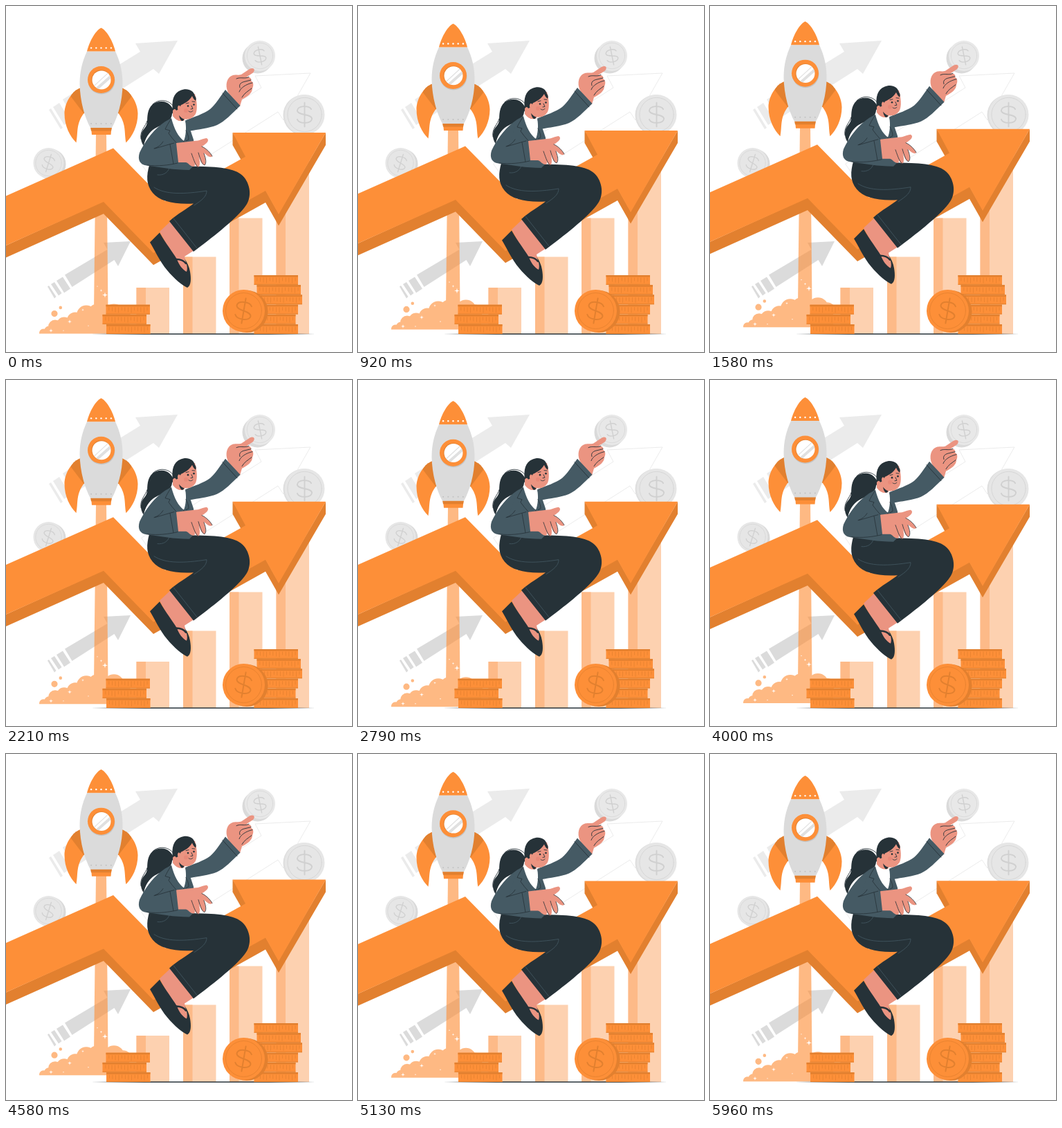
Write an HTML page with a canvas that moves like this. It is 500 by 500 pixels and loops after 6000 ms.

```html
<!DOCTYPE html>
<html lang="en">
<head>
<meta charset="utf-8">
<title>Growth</title>
<style>
html, body { margin: 0; width: 100%; height: 100%; overflow: hidden; background: #fff; }
canvas { display: block; width: 500px; height: 500px; }
</style>
</head>
<body>
<canvas id="stage"></canvas>
<script>
const canvas = document.getElementById('stage');
const ctx = canvas.getContext('2d');
const ratio = window.devicePixelRatio || 1;
canvas.width = canvas.height = 500 * ratio;

const ORANGE = '#fd8f38', DEEP = '#e2802f', PALE = '#fdd1b0', PEACH = '#fdba88';
const INK = '#263238', JACKET = '#455a64', SKIN = '#eb9481';
const GREY = '#dbdbdb', LIGHT = '#ebebeb', LINE = '#d0d0d0';
const FLOOR = 474;

const cache = new Map();
function path(d) {
  if (!cache.has(d)) cache.set(d, new Path2D(d));
  return cache.get(d);
}
function fill(d, color) {
  ctx.fillStyle = color;
  ctx.fill(path(d));
}
function stroke(d, color, width = 0.8) {
  ctx.strokeStyle = color;
  ctx.lineWidth = width;
  ctx.stroke(path(d));
}
function dot(x, y, r, color) {
  ctx.fillStyle = color;
  ctx.beginPath();
  ctx.arc(x, y, r, 0, Math.PI * 2);
  ctx.fill();
}
function ring(x, y, r, color, width) {
  ctx.strokeStyle = color;
  ctx.lineWidth = width;
  ctx.beginPath();
  ctx.arc(x, y, r, 0, Math.PI * 2);
  ctx.stroke();
}
function rect(x, y, w, h, color) {
  ctx.fillStyle = color;
  ctx.fillRect(x, y, w, h);
}
function at(x, y, draw) {
  ctx.save();
  ctx.translate(x, y);
  draw();
  ctx.restore();
}

// Rises from 0 to 1 and back once per period
function triangle(t, period) {
  const p = ((t / period) % 1 + 1) % 1;
  return 1 - Math.abs(2 * p - 1);
}

function coin(x, y, r, dx, dy, tilt, face, edge, line) {
  dot(x + dx, y + dy, r, edge);
  dot(x, y, r, face);
  ring(x, y, r * 0.85, line, r * 0.025);
  at(x, y, () => {
    ctx.rotate(tilt);
    ctx.scale(r / 30, r / 30);
    stroke('M10 -8C7 -14 -10 -14 -11 -6C-10 2 10 -2 11 6C10 14 -8 14 -11 7M0 -18V18', line, 1.9);
  });
}

function backdrop() {
  stroke('M196 228L369 118L360 101L440 97L401 165L393 153L220 263Z', '#e9e9e9', 0.9);
  fill('M187 54L248 50L221 98L213 91L98 164L82 135L194 66Z', LIGHT);
  fill('M68 146L77 140L93 166L84 172Z', LIGHT);
  fill('M62 150L65 148L82 176L79 178Z', LIGHT);
  coin(431.5, 157, 29, -2, 0.5, 0, '#e6e6e6', '#dedede', LINE);
  coin(367, 72, 22, -3.5, 3.5, -0.2, '#e8e8e8', '#dadada', LINE);
  coin(61.5, 227, 22, 3, 1.5, 0.3, '#e6e6e6', '#d9d9d9', LINE);
}

function bars() {
  for (const [x, top] of [[188.5, 407], [256, 362.5], [323, 306.5], [390.5, 215]]) {
    rect(x, top, 47.5, FLOOR - top, PALE);
    rect(x, top, 13.5, FLOOR - top, PEACH);
  }
}

function smallArrow() {
  fill('M141 342L180 340L162 376L156.5 367L95.5 406L85 388.5L146.5 352Z', GREY);
  fill('M73 397L82 391.5L93 408.5L84 414.5Z', GREY);
  fill('M65 402L70 399L80.5 415L76 418.5Z', GREY);
  fill('M60 405.5L62 404L72.5 420L70 422.5Z', GREY);
}

function star(x, y, r) {
  at(x, y, () => {
    ctx.scale(r, r);
    fill('M0 -1L.2 -.2L1 0L.2 .2L0 1L-.2 .2L-1 0L-.2 -.2Z', '#fff');
  });
}

// Jet and puffs are one see-through shape
const plume = new Path2D('M130 184H145L147.5 440H127ZM54 474L71 460L100 450L130 440H178V474Z');
const puffs = [
  [54, 472, 6], [62, 469, 7], [71, 463, 10], [84, 460, 11], [100, 454, 12],
  [116, 446, 14], [132, 444, 14], [156, 445, 15], [170, 447, 10],
  [70, 444, 4.6], [78.8, 435.3, 2.3]
];
for (const [x, y, r] of puffs) {
  plume.moveTo(x + r, y);
  plume.arc(x, y, r, 0, Math.PI * 2);
}

function smoke() {
  ctx.save();
  ctx.beginPath();
  ctx.rect(48, 180, 132, 293);
  ctx.clip();
  ctx.globalAlpha = 0.62;
  ctx.fillStyle = ORANGE;
  ctx.fill(plume);
  ctx.restore();
  star(143, 417, 4);
  star(92, 455.5, 3);
  star(65, 468.5, 3);
  star(111, 438.5, 2);
  star(137.5, 410.5, 2);
  dot(119, 461.5, 0.7, '#fff');
  dot(83, 468.5, 0.7, '#fff');
  dot(132, 404.5, 0.7, '#fff');
}

function fin() {
  fill('M-30 118C-44 124 -53 141 -53 155C-53 173 -45 188 -36 197C-33 182 -37 170 -24 153Z', ORANGE);
  fill('M-30 118C-36 120 -41 124 -44 130L-25 155L-20 150Z', DEEP);
}

function rocket() {
  smoke();
  at(137.5, 0, () => {
    fin();
    ctx.scale(-1, 1);
    fin();
  });
  fill('M123 175H152.5L151.5 185.5H124Z', ORANGE);
  fill('M122 175H153L152 180H123Z', DEEP);
  fill('M117 65C110 80 106.5 95 106.5 112C107 138 114 161 122 175.5H153C161 161 168.5 138 168.5 112C168.5 95 165 80 158 65Z', GREY);
  fill('M137.5 31C129 35 120 52 117 65H158C155 52 146 35 137.5 31Z', ORANGE);
  for (let i = -2; i <= 2; i++) {
    dot(137.5 + i * 7.2, 60, 1.2, '#fff');
    dot(137.5 + i * 7.2, 169.5, 1, '#c2c2c2');
  }
  dot(138, 107.5, 19.5, '#c4c4c4');
  dot(137.5, 106, 19.5, ORANGE);
  dot(137.5, 106, 14, DEEP);
  ctx.save();
  ctx.beginPath();
  ctx.arc(138, 106.3, 13.5, 0, Math.PI * 2);
  ctx.clip();
  rect(120, 90, 36, 34, '#fff');
  stroke('M129 121L155 98', '#e0e0e0', 4);
  stroke('M126 116L150 94', '#e0e0e0', 1.2);
  ctx.restore();
}

function bigArrow() {
  fill('M0 346L141 282L213 356L375 266L394 300L462 183V201L394 317.5L375 284L213 374.3L141 300.3L0 363.4Z', DEEP);
  fill('M327.5 183V201L340 223L350 217Z', DEEP);
  fill('M0 274.4L155 205.5L230 282L346 217.7L327.5 183H462L394 301L375 267L213 357L141 283L0 346Z', ORANGE);
}

function legs() {
  fill('M238 311L222 326L236 352L254 385L263 384L258 362L272 353Z', SKIN);
  fill('M222 327.5L208 341.5C214 351 222 369 233 382C243 394 255 404 262 407C268 404 267.5 393 266 384C265 377 262 371 258 365C261 372 263 379 261 384C255 381 250 374 247 366C240 354 232 345 222 327.5Z', INK);
  stroke('M246 366C252 366 257 368 260 372', INK, 2.6);
  fill('M207 230C203 245 202 258 212 270C222 282 242 287 271 285.5C262 293 248 300 236 311L271 355C295 337 331 309 344 292C354 281 355 264 346 250C337 236 316 233 285 232Z', INK);
  stroke('M214 262C230 273 258 272 290 267C290 275 284 280 272 288', JACKET, 0.8);
  stroke('M242 307L276 350M236 234C234 241 227 245 219 244', JACKET, 0.8);
}

function farArm() {
  fill('M325 131C317 122 317 110 322 104C329 97 334 101 340 99L352 91C358 88 361 92 357 96.5L347 103C353 102 355 105 354 108C358 110 358 115 356 119C356 126 349 131 341 135L338 145Z', SKIN);
  stroke('M333 105C339 102 345 106 351 102.5M338 118C336 113 340 110 346 109L354 107M337 124C339 118 347 113 356 111M341 132C344 126 350 123 355 119', INK, 0.9);
  fill('M258 166C272 160 286 156 295 149C303 142 309 132 317 121L338.5 144C326 156 316 167 305 172C293 177 278 178 264 181Z', JACKET);
  stroke('M313 126L334 149', INK, 0.9);
}

function ponytail() {
  fill('M243 151C239 145 235 138 225 138C213 138 207 145 205 155C203 166 206 170 200 177C194 183 193 194 199 202C201 191 207 182 215 177C226 171 239 168 240 156Z', INK);
  stroke('M242 145C236 136 222 133 212 142M204 166C202 174 193 180 195 192', INK, 0.9);
}

function head() {
  fill('M241 146V160C245 166 252 168 258 167L257 158Z', SKIN);
  fill('M250 156L258 163L255 167C252 165 250 161 250 156Z', INK);
  fill('M246 136L273 127C276 138 277 149 274 156C270 163 262 165 256 163C250 160 246 153 245 145Z', SKIN);
  fill('M241 151C239 137 242 126 252 122C261 118 271 121 273 130C275 132 275 135 274 137C271 135 270 132 269 130C265 137 258 141 253 143C251 147 249 150 246 151C244 148 243 149 241 151Z', INK);
  fill('M249 144C252 143 253 147 251 151C248 151 247 147 249 144Z', SKIN);
  ctx.globalAlpha = 0.3;
  dot(260, 151, 3, '#e06f62');
  ctx.globalAlpha = 1;
  dot(263, 144.5, 1.3, INK);
  dot(271.5, 142.5, 1.3, INK);
  stroke('M260 141L264 140M269 138L273 138.5M268 144L270 148.5L267 149M264 152C266 154 269 153 270 151.5', INK, 0.9);
}

function torso() {
  fill('M241 159C246 166 252 168 259 165L262 180L258 197L246 186L238 164Z', '#fff');
  fill('M239 162L230 167C214 178 203 192 197 206L206 231C224 233 242 237 265 237L270 232C270 222 273 206 271 193L267 181L259 165C261 177 260 187 257 195C249 189 243 178 239 162Z', JACKET);
  stroke('M238 164C234 170 232 174 230 178L237 180L235 184C242 194 250 202 256 208M257 195V210M260 180C262 184 264 188 264 193L260 195', INK, 0.8);
}

function nearArm() {
  fill('M246 198L272 195C280 195 285 191 290 191C295 194 290 199 283 203C290 206 296 213 298 217C296 220 291 217 286 212C288 220 290 227 287 230C283 229 281 224 279 217C280 224 281 231 278 233C274 232 272 226 270 220C272 226 275 231 271 232C266 232 264 227 260 226L249 226Z', SKIN);
  stroke('M283 203C290 206 296 213 298 217M286 213C289 221 290 227 287 230C283 229 281 222 278 212M278 233C274 231 272 224 268 213', INK, 0.8);
  fill('M231 167C215 178 200 196 193 212C190 222 193 229 203 230.5C220 232 235 230 248.5 227L243 198C235 200 226 203 217 205Z', JACKET);
  stroke('M237 200L242 228M243 198C235 200 226 203 215 206M227 196C224 201 220 204 214 206M204 230C220 232 235 230 248 227', INK, 0.8);
}

function rider() {
  ponytail();
  farArm();
  legs();
  head();
  torso();
  nearArm();
}

function stack(lefts, top) {
  lefts.forEach((x, i) => {
    const y = top + i * 14.2;
    rect(x, y, 63.5, 13.8, ORANGE);
    rect(x, y, 63.5, 2.5, DEEP);
    rect(x, y + 12.8, 63.5, 1, DEEP);
    for (let k = 0; k < 13; k++) {
      rect(x + 4 + k * 4.6, y + 3.5, 0.7, 5 + (k * 5 % 4), DEEP);
    }
  });
}

function foreground() {
  fill('M122 474L200 473.3H380L448 474L380 474.7H200Z', INK);
  stack([144.5, 139.5, 145], 431.7);
  stack([358.5, 362.5, 364.5, 358.5, 355, 358.5], 389);
  coin(343.5, 440.5, 30.5, 4.5, 1, 0.17, ORANGE, DEEP, DEEP);
}

function draw(t) {
  ctx.setTransform(ratio, 0, 0, ratio, 0, 0);
  ctx.lineCap = ctx.lineJoin = 'round';
  rect(0, 0, 500, 500, '#fff');
  backdrop();
  bars();
  smallArrow();
  at(0, 0.6 - 10 * triangle(t, 3000), rocket);
  at(0, 10 * triangle(t - 2500, 6000) - 8.33, () => {
    bigArrow();
    rider();
  });
  foreground();
}

const start = performance.now();
function tick() {
  draw((performance.now() - start) % 6000);
  requestAnimationFrame(tick);
}
tick();
</script>
</body>
</html>
```
